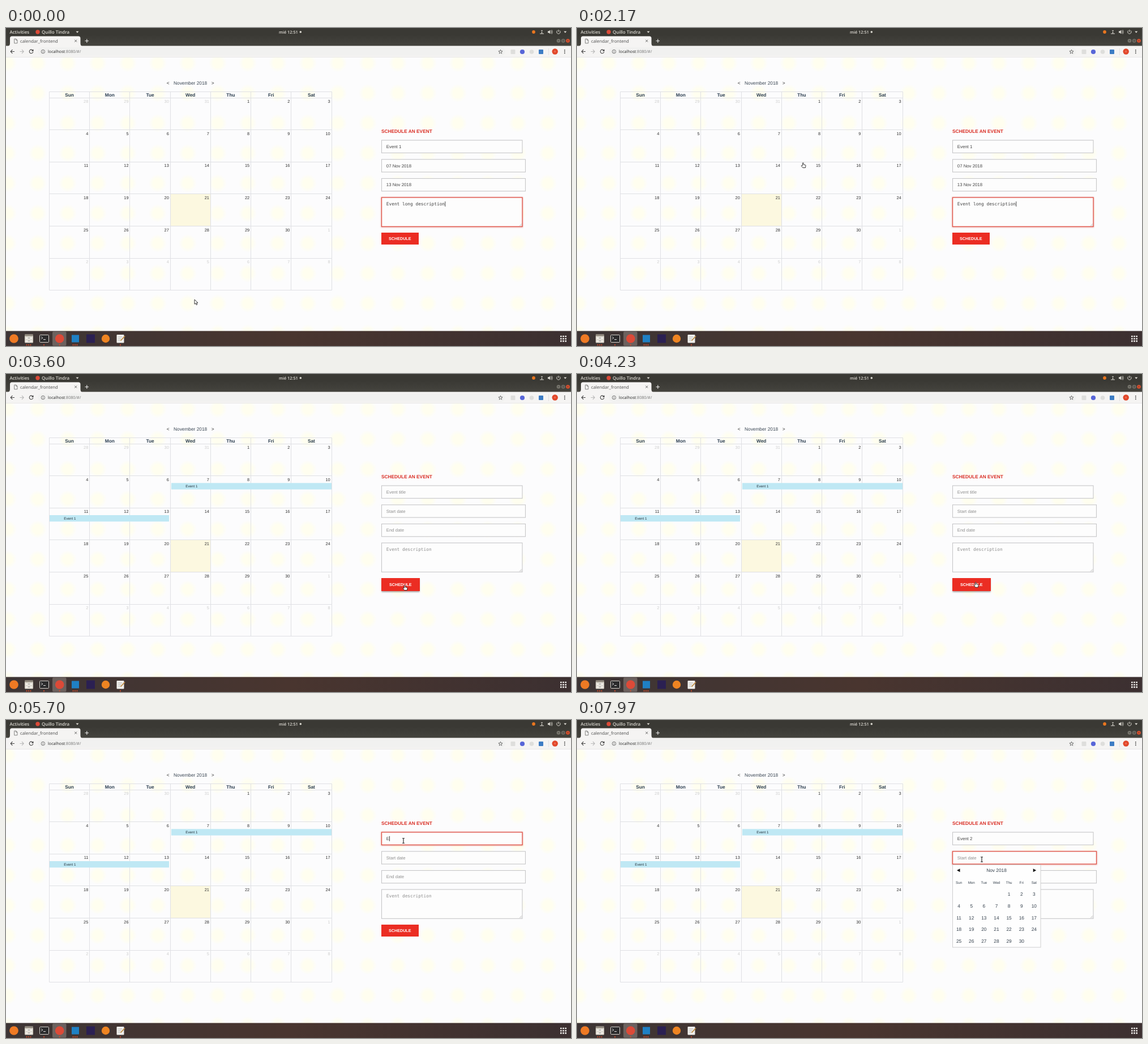
An HTML page that plays this animation: 998x561 px, repeating every 8 s.

```html
<!DOCTYPE html>
<html lang="en">
<head>
<meta charset="utf-8">
<title>calendar_frontend</title>
<style>
html, body { margin: 0; width: 100%; height: 100%; overflow: hidden; background: #fcfcfd; }
svg { display: block; width: 100vw; height: 100vh; }
text { font-family: "Liberation Sans", Arial, sans-serif; text-rendering: geometricPrecision; white-space: pre; }
.ui { font-family: "Open Sans", sans-serif; }
.mono { font-family: "DejaVu Sans Mono", monospace; }
</style>
</head>
<body>
<svg viewBox="0 0 998 561" preserveAspectRatio="none">
  <defs>
    <radialGradient id="glow">
      <stop offset=".5" stop-color="#fffeef"/><stop offset="1" stop-color="#fffeef" stop-opacity="0"/>
    </radialGradient>
    <pattern id="dots" x="29.5" y="35.5" width="53" height="53" patternUnits="userSpaceOnUse">
      <circle cx="26.5" cy="26.5" r="16" fill="url(#glow)"/>
    </pattern>
    <linearGradient id="bar" x2="0" y2="1">
      <stop stop-color="#3b3a35"/><stop offset="1" stop-color="#45443e"/>
    </linearGradient>
    <linearGradient id="dock">
      <stop stop-color="#3d3535"/><stop offset=".5" stop-color="#49352f"/><stop offset="1" stop-color="#3c3031"/>
    </linearGradient>
    <filter id="soft" x="-10%" y="-30%" width="120%" height="160%"><feGaussianBlur stdDeviation="1.2"/></filter>
  </defs>
  <g id="page"></g>
  <g id="events"></g>
  <g id="form"></g>
  <g id="shell"></g>
  <g id="pointer"></g>
</svg>
<script>
const LOOP = 8000;
const $ = id => document.getElementById(id);
const range = n => [...Array(n).keys()];

const rect = (x, y, w, h, fill, more = '') =>
  `<rect x="${x}" y="${y}" width="${w}" height="${h}" fill="${fill}" ${more}/>`;
const disc = (x, y, r, fill, more = '') => `<circle cx="${x}" cy="${y}" r="${r}" fill="${fill}" ${more}/>`;
const path = (d, stroke, width = 1, fill = 'none') =>
  `<path d="${d}" stroke="${stroke}" stroke-width="${width}" fill="${fill}"/>`;
const text = (s, x, y, size, fill, more = '') =>
  `<text x="${x}" y="${y}" font-size="${size}" fill="${fill}" ${more}>${s}</text>`;
const MID = 'text-anchor="middle"', END = 'text-anchor="end"', BOLD = 'font-weight="bold"';
const UI = 'class="ui"', SEMI = 'class="ui" font-weight="600"';
const DAYS = ['Sun', 'Mon', 'Tue', 'Wed', 'Thu', 'Fri', 'Sat'];
const INK = '#2c3e50';

// Month grid
const col = i => 76.5 + i * 71.22;
const row = i => 123 + i * 56.6;

function drawPage() {
  let s = rect(0, 51, 998, 484, '#fcfcfd') + rect(0, 51, 998, 484, 'url(#dots)');
  s += text('&lt;', 283.8, 100.2, 8.32, '#333') + text('November 2018', 296, 100.2, 8.32, '#3a4653')
     + text('&gt;', 362.8, 100.2, 8.32, '#333');
  s += rect(col(3), row(3), 71.2, 56.6, '#fcf8e0');
  let grid = 'M76.5 112.5H575.5';
  for (const i of range(8)) grid += `M${Math.round(col(i) - .5) + .5} 112.5V462.5`;
  for (const i of range(7)) grid += `M76.5 ${Math.round(row(i) - .5) + .5}H575.5`;
  s += path(grid, '#dfe0e4');
  DAYS.forEach((d, i) => s += text(d, col(i) + 35.6, 120.6, 8.32, INK, MID + BOLD));
  for (const i of range(42)) {
    const day = i - 3, other = day < 1 || day > 30;
    const label = day < 1 ? day + 31 : day > 30 ? day - 30 : day;
    s += text(label, col(i % 7 + 1) - 2.4, row(i / 7 | 0) + 9.1, 7.4, other ? '#cfcfcf' : '#333', END);
  }
  $('page').innerHTML = s;
}

function drawEvents(shown) {
  const bar = (x, y, w) => rect(x, y, w, 11.3, '#bfe8f4') + text('Event 1', x + 25.3, y + 7.8, 6.24, '#23323c');
  return shown ? bar(292, 192.3, 283) + bar(77, 249, 211) : '';
}

// Browser window and desktop panels
function drawShell() {
  const light = '#dedbd4', dark = '#4c4c4c';
  let s = rect(0, 0, 998, 14, '#3a3934') + rect(0, 13.5, 998, 18.5, 'url(#bar)');
  s += text('Activities', 6.5, 9.8, 7.9, light, SEMI) + disc(56, 7, 3.7, '#dc4a38')
     + text('Quillo Tindra', 63, 9.8, 7.9, light, SEMI) + path('M123.5 5.8h5l-2.5 3z', 'none', 0, light)
     + text('mié 12:51', 482, 9.6, 7.3, light, SEMI) + disc(520.3, 7, 1.8, light);
  s += disc(932, 7, 2.9, '#e9761f')
     + path('M943 10h7M946.5 10V6M945 4.5h3', light, 1.1)
     + path('M957 5.5h2l2.2-2v7l-2.2-2h-2z', 'none', 0, light) + path('M962.5 4.5q1.7 2.5 0 5M964 3.3q2.4 3.7 0 7.4', light, .8)
     + path('M974 4.4a3.2 3.2 0 1 0 3.8 0M975.9 3v4', light, 1) + path('M985.3 5.8h5l-2.5 3z', 'none', 0, light);
  s += path('M4 32Q7 31 7 27V18Q7 14.5 10.5 14.5H128Q131.5 14.5 131.5 18V27Q131.5 31 134 32z', 'none', 0, '#f5f4f3')
     + path('M14.7 19.3h3.2l2 2v5.6h-5.2zM17.8 19.5v2h2', '#666', .8)
     + text('calendar_frontend', 25, 25.6, 7.8, dark, UI)
     + path('M121.2 20.7l4 4m0-4l-4 4', '#555', .9) + path('M139.5 22.7h6.5M142.8 19.4v6.5', '#eee', 1.1);
  s += [976, 984.3, 992.5].map((x, i) => disc(x, 22.5, 3.3, i < 2 ? '#77756d' : '#e1502d')).join('')
     + path('M974.5 22.5h3M983 21.2h2.6v2.6h-2.6zM991.3 21.3l2.4 2.4m0-2.4l-2.4 2.4', '#33322e', .7);
  s += rect(0, 31.5, 998, 20, '#f5f4f3') + rect(56, 34, 826, 15, '#f1f1f0', 'rx="7.5"') + rect(0, 51, 998, .7, '#e2e1e0');
  s += path('M15 41.5H8.3M11.4 38.2l-3.2 3.3 3.2 3.3', '#444', 1.1) + path('M24.5 41.5h6.7M28 38.2l3.2 3.3-3.2 3.3', '#b9b9b9', 1.1)
     + path('M47.3 39.6a3.3 3.3 0 1 0 .5 2.4M48 37.8v2.6h-2.6', '#444', 1.1)
     + path('M62.2 41.6a3.2 3.2 0 1 0 6.4 0a3.2 3.2 0 1 0-6.4 0M65.4 41v2.3M65.4 39.4v.8', '#555', .8)
     + text('localhost<tspan fill="#777">:8080/#/</tspan>', 74, 44.2, 7.2, '#222', UI);
  const star = range(10).map(i => {
    const a = i * Math.PI / 5, r = i % 2 ? 1.6 : 3.8;
    return `${873.5 + r * Math.sin(a)} ${42 - r * Math.cos(a)}`;
  });
  s += path(`M${star.join('L')}z`, '#555', .8)
     + rect(891.5, 38, 8, 8, '#dededc', 'rx="1"') + disc(912, 42, 4.1, '#5866d8') + disc(928.5, 42, 3.8, '#dededc')
     + rect(941, 38, 8, 8, '#3c7cc4', 'rx="1"') + rect(958, 36, .7, 12, '#dadada')
     + disc(969.7, 41.5, 5.2, '#e2472a') + text('n', 969.7, 43.4, 5, '#f6c9bd', MID)
     + [39, 41.7, 44.4].map(y => disc(986.8, y, .9, '#444')).join('');

  s += rect(0, 534.5, 998, 27, 'url(#dock)') + rect(82, 535.5, 24.5, 25, '#6c615e', 'rx="2"');
  s += disc(14, 548, 7.8, '#ee7a24')
     + rect(33, 540.5, 15, 15, '#d8d3c9', 'rx="1.5"') + rect(33, 540.5, 15, 3, '#8d867b') + rect(35, 545.5, 11, 3.5, '#f2efe9')
     + rect(35, 550.5, 11, 3.5, '#f2efe9') + path('M38.5 547h4M38.5 552h4', '#777', .9)
     + rect(59.5, 541.5, 16, 13, '#2b2b2c', 'rx="1" stroke="#d5d2cc"') + path('M62.3 544.8l2.5 2-2.5 2M66 549.6h4', '#eee', 1)
     + disc(94.7, 548, 7.8, '#dc4a38') + rect(116, 541.5, 13, 13, '#1f80c4') + rect(142, 540.5, 15, 15, '#2b2052')
     + disc(176, 548, 7.2, '#ee8422')
     + rect(195.5, 541, 13, 14.5, '#f0efec', 'rx="1"') + path('M198 545h7M198 548h5M198 551h4', '#aaa', .8)
     + path('M202.5 551.5l7.5-8', '#bd8b42', 1.8);
  for (const [x, n] of [[40, 3], [67, 1], [94.7, 1], [122, 3], [202, 1]])
    for (const i of range(n)) s += disc(x + (i - (n - 1) / 2) * 3.4, 559, 1.1, '#e24f2a');
  for (const i of range(9)) s += rect(979 + i % 3 * 4.2, 542.7 + (i / 3 | 0) * 4.2, 2.6, 2.6, '#f0eeec', 'rx=".5"');
  $('shell').innerHTML = s;
}

// Scheduling form
const TITLE = 'Event 2';
const KEYS = [5650, 5900, 6050, 6200, 6350, 6770, 6950];
const SUBMIT = 3430, PICK_TITLE = 4580, PICK_DATE = 7750;
const within = (t, ...spans) => spans.some(([a, b]) => t >= a && t < b);
const textWidth = s => [0, .667, 1.167, 1.723, 2.279, 2.557, 2.835, 3.391][s.length] * 7.8;

function box(x, y, w, h, focused) {
  const edge = focused ? '#de5145' : '#c6c6c8';
  return (focused ? rect(x, y + .5, w, h, 'none', 'stroke="#d9554a" stroke-opacity=".55" stroke-width="2" filter="url(#soft)"') : '')
    + rect(x, y, w, h, '#fdfdfd', `stroke="${edge}" stroke-width="${focused ? 1.3 : 1.1}"`);
}

function drawPicker() {
  const x = i => 674.6 + i * 22.13;
  let s = rect(663.5, 255.5, 155.5, 145.5, '#fefefe', 'stroke="#cfcfd0"')
    + path('M676.5 262.3v6l-5.5-3zM805.7 262.3v6l5.5-3z', 'none', 0, '#111') + text('Nov 2018', 741, 268.2, 8.32, '#333f4b', MID);
  DAYS.forEach((d, i) => s += text(d, x(i), 288.8, 6.24, '#333f4b', MID));
  for (const d of range(30)) s += text(d + 1, x((d + 4) % 7), 310.2 + ((d + 4) / 7 | 0) * 20.75, 8.32, '#333f4b', MID);
  return s;
}

function drawForm(t) {
  const filled = t < SUBMIT, raised = t >= 3400 && t < 4260, dy = raised ? -1 : 0;
  const focus = t < SUBMIT ? 'note' : t < PICK_TITLE ? '' : t < PICK_DATE ? 'title' : 'start';
  const typed = filled ? 'Event 1' : TITLE.slice(0, KEYS.filter(k => t >= k).length);
  const field = (value, hint, y) => text(value || hint, 671.8, y + 13.9, 7.8, value ? '#444' : '#8f8f8f');

  let s = text('SCHEDULE AN EVENT', 663, 184.9, 8.32, '#d92b22', BOLD)
    + box(663.5, 198, 248.5, 22.3, focus === 'title') + field(typed, 'Event title', 198)
    + box(663.5, 231.8, 254, 22.3, focus === 'start') + field(filled && '07 Nov 2018', 'Start date', 231.8)
    + box(663.5, 265.5, 254, 22.3) + field(filled && '13 Nov 2018', 'End date', 265.5)
    + box(663.5, 299, 248.5, 51.3, focus === 'note')
    + path('M907 349.3l4-4M909.3 349.3l1.7-1.7', '#999', .6)
    + text(filled ? 'Event long description' : 'Event description', 671.8, 313, 7.8, filled ? '#444' : '#8f8f8f', 'class="mono"');
  if (focus === 'note' && !within(t, [200, 630], [1130, 1630], [2200, 2700], [3130, SUBMIT]))
    s += rect(775.4, 306, .8, 9, '#222');
  if (focus === 'title' && !within(t, [5130, 5600], [7450, PICK_DATE]))
    s += rect(672 + textWidth(typed), 204.8, .8, 9, '#222');
  s = `<g transform="translate(0 ${dy})">${s}</g>`;

  const [y, w, h] = raised ? [360, 68, 23] : [361, 66, 21];
  if (raised) s += rect(663.5, y + 2, w - 1, h, '#000', 'opacity=".3" filter="url(#soft)"');
  s += rect(663, y, w, h, '#eb2d23') + text('SCHEDULE', 663 + w / 2 - .2, 374, 7.2, '#fff', MID + BOLD);
  return s + (focus === 'start' ? drawPicker() : '');
}

// Pointer route: time, x, y
const ROUTE = [
  [0, 333, 479], [870, 333, 479], [1030, 708, 309], [1630, 692, 276], [1730, 680, 270], [1950, 350, 216],
  [2170, 400, 242], [2270, 398, 248], [2500, 709, 373], [2770, 706, 376], [3400, 705, 377], [4200, 705, 377],
  [4480, 704, 223], [4630, 703, 220], [5000, 702, 213], [7370, 702, 213], [7650, 715, 246], [LOOP, 715, 246]
];

function pointerAt(t) {
  const i = ROUTE.findIndex(p => p[0] > t);
  const [t0, x0, y0] = ROUTE[i - 1], [t1, x1, y1] = ROUTE[i];
  const k = (t - t0) / (t1 - t0), e = k * k * (3 - 2 * k);
  return [x0 + (x1 - x0) * e, y0 + (y1 - y0) * e];
}

function drawPointer(t) {
  const [x, y] = pointerAt(t);
  const over = (l, top, r, b) => x >= l && x <= r && y >= top && y <= b;
  let shape;
  if (over(663, 361, 730, 383) || over(76, 123, 575, 462))
    shape = path('M-1.6 .8V-3.8q.9-1.2 1.8 0V-1l2.8.5q1.2.3 1 1.6l-.6 3.4h-4.6l-2.4-3q-.3-1.4 1-1z', '#222', .9, '#fff');
  else if (over(663, 198, 912, 220.5) || over(663, 231, 918, 288) || over(663, 298, 912, 351))
    shape = path('M-2-4.3h1.4q.6 0 .6.8V3.5q0 .8-.6.8H-2M2-4.3H.6q-.6 0-.6.8M0 3.5q0 .8.6.8H2', '#222', 1.1);
  else
    shape = path('M0 0V8.2l1.9-1.7 1.4 3 1.5-.7-1.4-2.9H6z', '#222', .9, '#fff');
  return `<g transform="translate(${x.toFixed(2)} ${y.toFixed(2)})">${shape}</g>`;
}

const last = {};
function put(id, markup) {
  if (last[id] !== markup) $(id).innerHTML = last[id] = markup;
}

function frame(now) {
  const t = now % LOOP;
  put('events', drawEvents(t >= SUBMIT + 60));
  put('form', drawForm(t));
  put('pointer', drawPointer(t));
  requestAnimationFrame(frame);
}

drawPage();
drawShell();
frame(0);
</script>
</body>
</html>
```
